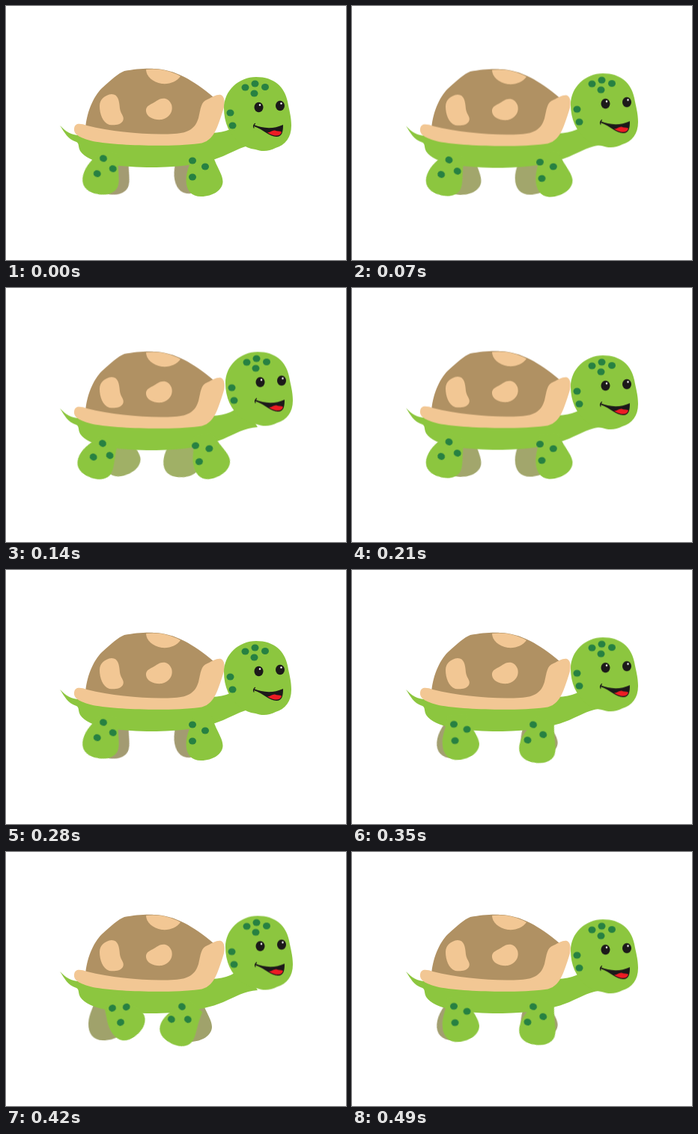
Write an HTML page that moves like this. It is 454x340 px and loops after 0.56 s.

```html
<!DOCTYPE html>
<html lang="en">
<head>
<meta charset="utf-8">
<title>Walking turtle</title>
<style>
  html, body { margin: 0; width: 100%; height: 100%; overflow: hidden; background: #fff; }
  svg { display: block; width: 100vw; height: 100vh; }
  .skin { fill: #8cc63f; }
  .spots { fill: #278142; }
  .shell { fill: #b09163; }
  .cream { fill: #f2c794; }
  .ink { fill: #1c191a; }
</style>
</head>
<body>
<svg viewBox="0 0 454 340">
  <defs>
    <path id="leg" d="M-8-12C-10 4-17 12-17 26C-17 40-10 48 3 48C19 48 32 39 32 28C32 18 23 8 17-12Z"/>
    <ellipse id="spot" rx="5" ry="4.6"/>
    <g id="legSpots" class="spots">
      <use href="#spot"/><use href="#spot" x="17" y="8"/><use href="#spot" x="0" y="22"/>
    </g>
    <g id="eye">
      <ellipse class="ink" rx="6" ry="6.8"/><circle cx="1.5" cy="-3" r="1.2" fill="#fff"/>
    </g>
  </defs>

  <g id="farBack"><use href="#leg"/></g>
  <g id="farFront"><use href="#leg"/></g>

  <g id="body">
    <path class="skin" d="M72 160C80 168 87 173 98 173L270 170C292 170 304 165 316 153L336 185C318 186 306 194 290 201C258 214 222 216 188 216C150 215 110 211 99 194C96 188 98 184 94 182C82 178 78 169 72 160Z"/>
    <path class="shell" d="M106 166C107 144 116 122 128 110C140 99 150 90 158 87C172 84 190 83 199 84C225 85 250 99 277 122L260 175H106Z"/>
    <path class="cream" d="M187 85C203 83 219 86 233 94C228 101 219 105 208 104C196 102 187 94 187 85Z"/>
    <path class="cream" d="M125 134C125 125 132 119 141 118C150 118 151 127 152 137C153 145 159 148 156 154C153 159 145 160 138 159C129 156 125 144 125 134Z"/>
    <path class="cream" d="M187 141C186 133 194 132 201 127C208 122 217 122 221 132C224 142 217 150 208 152C198 153 188 149 187 141Z"/>
    <path class="cream" d="M91 164C92 156 99 157 108 160C145 169 190 173 225 171C245 170 253 163 257 150C260 138 260 128 269 125C276 122 281 118 287 119C292 121 293 130 290 139C283 160 278 182 258 184C218 189 150 187 116 181C101 177 90 173 91 164Z"/>
  </g>

  <g id="nearBack"><use href="#leg" class="skin"/><use href="#legSpots"/></g>
  <g id="nearFront"><use href="#leg" x="8.5" class="skin"/><use href="#legSpots"/></g>

  <g id="head">
    <path class="skin" d="M291 137C291 113 311 95 334 95C358 95 372 108 376 128C378 139 381 148 381 160C381 176 373 186 360 190C351 195 341 195 333 192C325 191 319 188 313 184C298 173 291 155 291 137Z"/>
    <g class="spots">
      <use href="#spot" x="319.5" y="109"/><use href="#spot" x="332.5" y="104"/>
      <use href="#spot" x="346" y="108.5"/><use href="#spot" x="331.5" y="117"/>
      <use href="#spot" x="299.5" y="143"/><use href="#spot" x="302.500" y="160"/>
    </g>
    <use href="#eye" x="337.500" y="135.500"/>
    <use href="#eye" x="366" y="133.500"/>
    <path class="ink" d="M331 159C343 164 357 165 370 159C370 168 369 175 361 175C352 175 345 166 331 161Z"/>
    <path fill="#ed1c24" d="M349 169C353 170 355 166 359 166.500C362 168 365 167 368 168.500C367 173 363 174 359 173.500C355 173 351 171 349 169Z"/>
    <path d="M332.500 157.500Q329.500 160 331 163" fill="none" stroke="#1c191a" stroke-width="1.200" stroke-linecap="round"/>
  </g>
</svg>
<script>
  const STRIDE = 560;

  const pose = (x, y, turn = 0, fill = "") => ({
    transform: `translate(${x}px, ${y}px) rotate(${turn}deg)`,
    ...(fill && { fill })
  });

  // Rest, legs apart, rest, legs together: two held steps per quarter stride.
  function walk(id, rest, apart, together) {
    const frames = [rest, apart, rest, together, rest].map(p => ({ ...p, easing: "steps(2, end)" }));
    document.getElementById(id)
      .animate(frames, { duration: STRIDE, iterations: Infinity })
      .startTime = 0;
  }

  const [dusk, olive, khaki] = ["#a39b72", "#a0b066", "#a0a26b"];
  const level = pose(0, 0), raised = pose(2, -9.5);

  walk("head", level, raised, raised);
  walk("body", level, pose(0, 1.2), level);
  walk("nearBack", pose(130, 204, 22), pose(129, 208, 34), pose(142, 209, -30));
  walk("nearFront", pose(249, 207), pose(253, 211, -13), pose(235, 207, 40));
  walk("farBack", pose(144, 204, 22, dusk), pose(143, 205, -10, olive), pose(128, 204, 2, khaki));
  walk("farFront", pose(237, 204, -11, dusk), pose(232, 205, 10, olive), pose(243, 206, 0, khaki));
</script>
</body>
</html>
```
